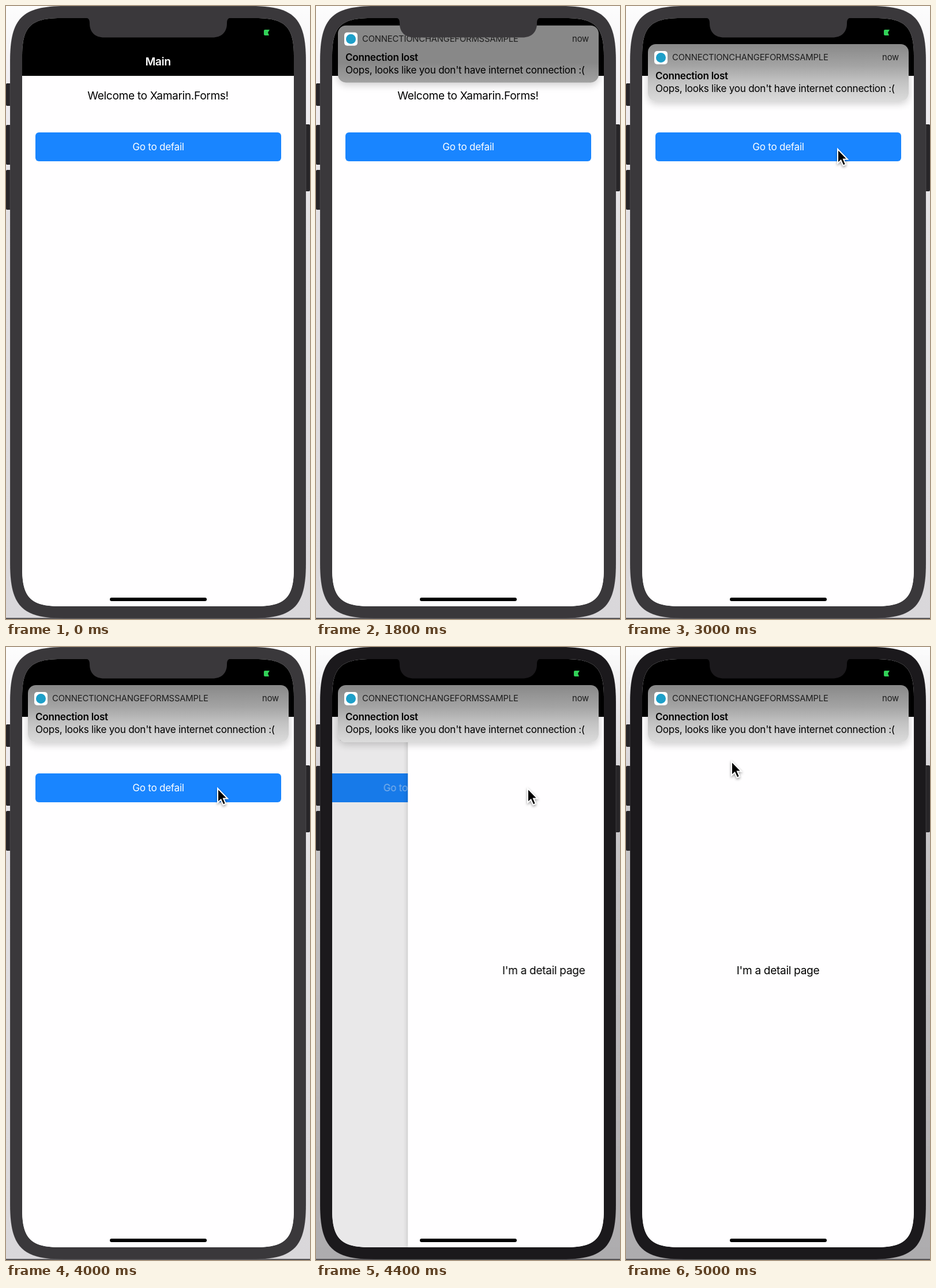
Recreate the animation shown at these times as an HTML page. Size 527 by 1062 pixels, loop 5100 ms.

```html
<!DOCTYPE html>
<html lang="en">
<head>
<meta charset="utf-8">
<title>Connection banner</title>
<style>
  html, body { margin: 0; width: 100%; height: 100%; overflow: hidden; }
  body { font-family: Inter, "Open Sans", sans-serif; color: #000; }
  div, svg, span { position: absolute; display: block; }
  span { white-space: nowrap; line-height: 24px; }

  .stage {
    left: 0; top: 0; width: 527px; height: 1062px; overflow: hidden;
    background: linear-gradient(#fdfdfd, #f1eff2 12%, #e2e0e3 35%, #d9d7da);
    color: #3a383b;
    animation: focus 5.1s step-end infinite;
  }
  .shade {
    inset: 0; opacity: 0;
    background: linear-gradient(#fff0, #0002 30%, #0003);
    animation: shade 5.1s step-end infinite;
  }
  .ground { left: 0; top: 1060px; width: 527px; height: 2px; background: #555356; }
  .key { width: 9px; background: #272528; border-radius: 2px; }
  .shell { left: 0; top: 0; width: 527px; height: 1062px; }

  .screen {
    left: 28px; top: 21px; width: 471px; height: 1019px; background: #fff; color: #000;
    clip-path: path("M0 66C0 15 15 0 66 0H405C456 0 471 15 471 66V953C471 1004 456 1019 405 1019H66C15 1019 0 1004 0 953Z");
  }
  .page { left: 0; top: 100px; width: 471px; height: 919px; background: #fffeff; }
  .page span, .nav span { left: 0; width: 100%; text-align: center; }
  .label { font-size: 19.1px; letter-spacing: -.017em; }
  .main { animation: recede 5.1s infinite; }
  .button {
    left: 23px; top: 98px; width: 426px; height: 50px;
    border-radius: 6px; background: #1985ff; color: #fff;
  }
  .button span {
    top: 13px; font-size: 17.1px; letter-spacing: -.016em;
    animation: press 5.1s step-end infinite;
  }
  .dim { inset: 0 -200px; background: #000; opacity: 0; animation: dim 5.1s infinite; }
  .detail { box-shadow: 0 0 9px #0003; animation: push 5.1s infinite; }

  .nav { left: 0; top: 0; width: 471px; height: 100px; background: #000; color: #fff; }
  .nav span { top: 63px; font-size: 19.3px; font-weight: 600; letter-spacing: -.02em; }

  /* The backdrop tint lightens as the banner slides down over the white page. */
  .banner {
    left: 10px; top: 45px; width: 452px; height: 99px; border-radius: 14px;
    background: linear-gradient(#888 300px, #a4a4a4 338px, #c2c2c2 365px, #dcdcdc) 0 -300px / 100% 399px no-repeat;
    box-shadow: 0 4px 14px #0003;
    animation: drop 5.1s infinite;
  }
  .icon { left: 11px; top: 12px; width: 23px; height: 23px; border-radius: 5px; background: #fff; }
  .icon div { left: 3px; top: 3px; width: 17px; height: 17px; border-radius: 50%; background: #1e9fc8; }
  .small { top: 11px; font-size: 14.8px; letter-spacing: -.012em; color: #1c1c1c; }
  .text { left: 13px; font-size: 17.1px; letter-spacing: -.016em; }

  .home { left: 180px; top: 1025px; width: 168px; height: 6px; border-radius: 3px; background: #000; }
  .pointer {
    left: 0; top: 0; width: 30px; height: 40px; overflow: visible;
    filter: drop-shadow(0 2px 2px #0006);
    animation: point 5.1s linear infinite;
  }

  @keyframes focus { 0% { color: #3a383b } 80.39%, to { color: #1b191c } }
  @keyframes shade { 0% { opacity: 0 } 80.39%, to { opacity: 1 } }
  @keyframes press { 0% { opacity: 1 } 80.39%, to { opacity: .5 } }
  @keyframes drop {
    0%, 30.392% {
      transform: translateY(-150px); background-position-y: 0;
      animation-timing-function: cubic-bezier(.2, .44, .4, 1);
    }
    41.176%, to { transform: none; background-position-y: -300px }
  }
  @keyframes push {
    0%, 82.353% { transform: translateX(490px); animation-timing-function: cubic-bezier(.25, .51, .4, 1) }
    92.157%, to { transform: none }
  }
  @keyframes recede {
    0%, 82.353% { transform: none; animation-timing-function: cubic-bezier(.25, .51, .4, 1) }
    92.157%, to { transform: translateX(-140px) }
  }
  @keyframes dim {
    0%, 82.353% { opacity: 0; animation-timing-function: cubic-bezier(.25, .51, .4, 1) }
    92.157%, to { opacity: .12 }
  }
  @keyframes point {
    0%, 40.196% { transform: translate(532px, 188px) }
    43.137% { transform: translate(462px, 212px) }
    45.098% { transform: translate(403px, 250px) }
    47.059% { transform: translate(378px, 262px) }
    52.941% { transform: translate(367px, 257px) }
    60.784%, 90.196% { transform: translate(367px, 245px); animation-timing-function: ease-in-out }
    98.039%, to { transform: translate(183px, 198px) }
  }
</style>
</head>
<body>
<div class="stage">
  <div class="shade"></div>
  <div class="ground"></div>
  <div class="key" style="left:0;top:134px;height:39px"></div>
  <div class="key" style="left:0;top:206px;height:69px"></div>
  <div class="key" style="left:0;top:284px;height:69px"></div>
  <div class="key" style="left:518px;top:205px;height:116px"></div>
  <svg class="shell">
    <path fill="currentColor" stroke="#fff" stroke-opacity=".12" d="M7 95C7 21 28 0 102 0H425C499 0 520 21 520 95V966C520 1040 499 1061 425 1061H102C28 1061 7 1040 7 966Z"/>
  </svg>

  <div class="screen">
    <div class="page main">
      <span class="label" style="top:22px">Welcome to Xamarin.Forms!</span>
      <div class="button"><span>Go to defail</span></div>
      <div class="dim"></div>
    </div>
    <div class="page detail">
      <span class="label" style="top:427px">I'm a detail page</span>
    </div>
    <div class="nav">
      <span>Main</span>
      <svg style="left:419px;top:20px" width="10" height="10"><path d="M2 0H10L7 5L9 10H2Q0 10 0 8V2Q0 0 2 0Z" fill="#32d158"/></svg>
    </div>
    <div class="banner">
      <div class="icon"><div></div></div>
      <span class="small" style="left:42px">CONNECTIONCHANGEFORMSSAMPLE</span>
      <span class="small" style="right:17px">now</span>
      <span class="text" style="top:43px;font-weight:600">Connection lost</span>
      <span class="text" style="top:65px">Oops, looks like you don't have internet connection :(</span>
    </div>
  </div>

  <svg style="left:0;top:0" width="527" height="60">
    <path fill="currentColor" d="M136 20C143 20.500 145 23 145 30C145 46 155 54.500 170 54.500H358C373 54.500 383 46 383 30C383 23 385 20.500 392 20Z"/>
  </svg>
  <div class="home"></div>
  <svg class="pointer" viewBox="0 0 30 40">
    <path d="M0 0V24.500L5.500 19.500L9.500 28.500L14 26.500L10 17.500H17Z" fill="#000" stroke="#fff" stroke-width="2"/>
  </svg>
</div>
</body>
</html>
```
